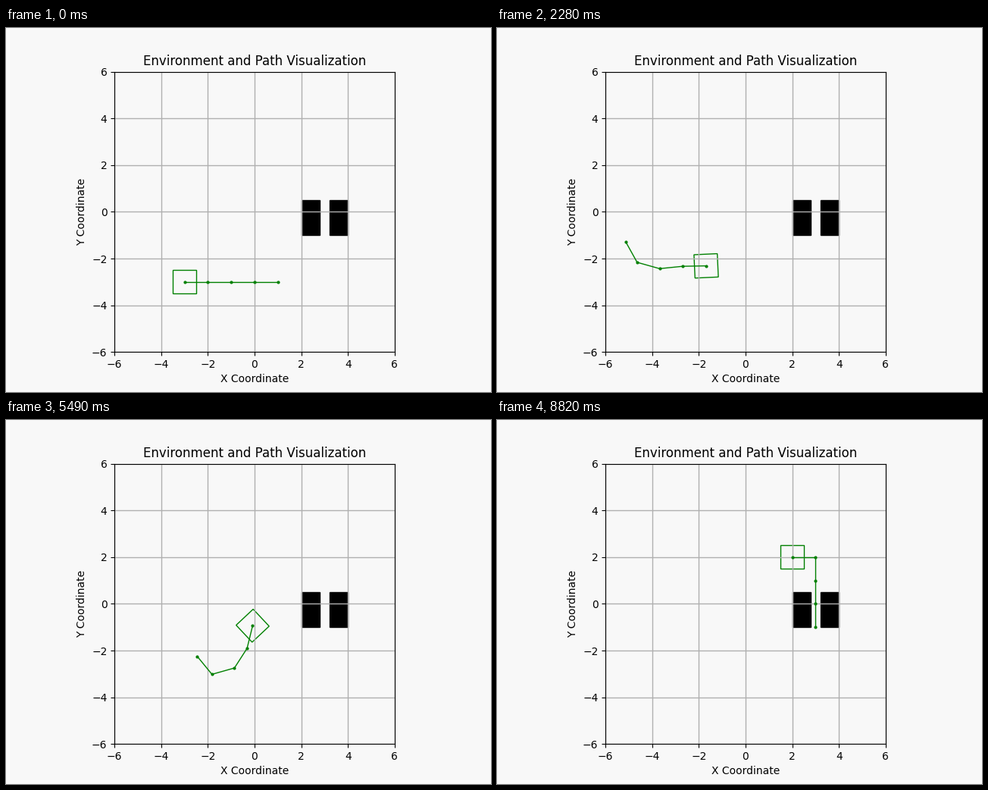
Recreate the animation shown at these times as a matplotlib script. Size 640x480 px, loop 8850 ms.

```python
import numpy as np
import matplotlib.pyplot as plt
from matplotlib.animation import FuncAnimation
from matplotlib.patches import Polygon, Rectangle

FRAMES = 295
INTERVAL = 30
BG = "#f8f8f8"


def pose(x, y, heading=0, joints=(0, 0, 0, 0)):
    """Base position, base heading and joint angles, in degrees."""
    return np.array([x, y, heading, *joints], dtype=float)


# The robot moves in straight lines through joint space between these poses.
start = pose(-3, -3)
reach = pose(-0.515, -1.7, 175.5, (167.5, 9, -40.6, -85.8))
fold = pose(0.86, 0.73, 41, (26, -80, -43.4, -24))
goal = pose(2, 2, joints=(0, -90, 0, 0))
legs = [(start, reach, 144), (reach, fold, 124), (fold, goal, 26)]


def pose_at(step):
    for a, b, length in legs:
        if step <= length:
            return a + (b - a) * step / length
        step -= length
    return goal


def unit(angle):
    return np.column_stack([np.cos(angle), np.sin(angle)])


def base_corners(center, heading):
    turns = heading + np.pi / 4 + np.arange(4) * np.pi / 2
    return center + unit(turns) * np.sqrt(0.5)


def arm_points(center, heading, joints):
    links = unit(heading + np.cumsum(joints))
    return center + np.vstack([[0, 0], np.cumsum(links, axis=0)])


fig, ax = plt.subplots(figsize=(6.4, 4.8), dpi=100, facecolor=BG)
ax.set_facecolor(BG)
ticks = range(-6, 7, 2)
ax.set(xlim=(-6, 6), ylim=(-6, 6), aspect="equal", xticks=ticks, yticks=ticks,
       xlabel="X Coordinate", ylabel="Y Coordinate",
       title="Environment and Path Visualization")
ax.grid(True, linewidth=1)

for left in (2, 3.2):
    ax.add_patch(Rectangle((left, -1), 0.8, 1.5, color="black"))

base = ax.add_patch(Polygon(base_corners(start[:2], 0), fill=False,
                            edgecolor="green", linewidth=1))
arm, = ax.plot([], [], "o-", color="green", linewidth=1, markersize=2)


def update(step):
    now = pose_at(step)
    center, (heading, *joints) = now[:2], np.radians(now[2:])
    base.set_xy(base_corners(center, heading))
    arm.set_data(*arm_points(center, heading, joints).T)
    return base, arm


anim = FuncAnimation(fig, update, frames=FRAMES, interval=INTERVAL,
                     init_func=lambda: update(0), repeat=True,
                     repeat_delay=0, blit=False)
plt.show()
```
